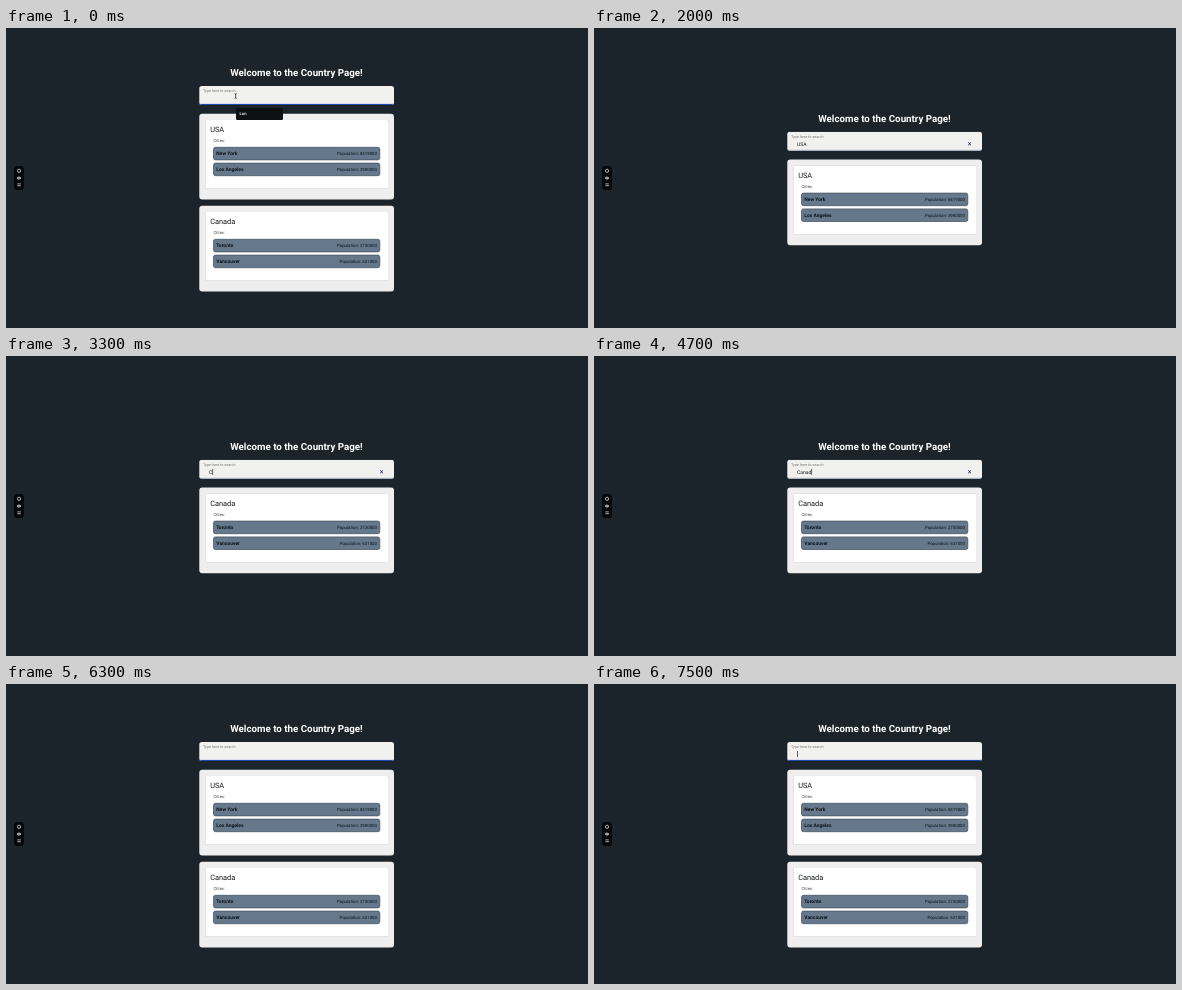
An HTML page that plays this animation: 582x300 px, repeating every 8 s.

```html
<!DOCTYPE html>
<html lang="en">
<head>
<meta charset="utf-8">
<title>Country page</title>
<style>
  html, body { margin: 0; width: 100%; height: 100%; overflow: hidden; background: #1b242b; }
  svg { display: block; width: 582px; height: 300px; }
  text { font-family: Roboto, sans-serif; text-rendering: geometricPrecision; fill: #15191d; }
  .heading { font-size: 9.75px; font-weight: 700; fill: #fff; text-anchor: middle; }
  .label { font-size: 3.75px; fill: #777; }
  .query { font-size: 5px; }
  .country { font-size: 7.4px; }
  .cities { font-size: 4.2px; fill: #444; }
  .city { font-size: 4.95px; font-weight: 700; fill: #0c1218; }
  .population { font-size: 4.35px; fill: #0c1218; text-anchor: end; }
  .row { fill: #66798c; stroke: #3d4c5a; stroke-width: .7; }
  .paper { fill: #fff; filter: drop-shadow(0 .6px .5px rgba(0, 0, 0, .3)); }
</style>
</head>
<body>
<svg viewBox="0 0 582 300">
  <defs>
    <clipPath id="field"><rect x="193.3" y="58" width="194.7" height="19" rx="2.5"/></clipPath>
  </defs>
  <rect width="582" height="300" fill="#1b242b"/>

  <g id="toolbar">
    <rect x="8" y="138" width="10" height="24" rx="3.5" fill="#05080a"/>
    <g fill="none" stroke="#d5d9dc" stroke-width=".8">
      <circle cx="13" cy="142.8" r="1.6"/>
      <path d="M11 150.1q2-2.4 4 0q-2 2.4-4 0zM11.4 155.9h3.4M11.4 157.7h3.4"/>
    </g>
    <circle cx="13" cy="150.1" r=".8" fill="#d5d9dc"/>
  </g>

  <g id="page">
    <text class="heading" x="290.5" y="47.8">Welcome to the Country Page!</text>
    <g clip-path="url(#field)">
      <rect x="193" y="58" width="196" height="19" fill="#f1f1f0"/>
      <rect id="underline" x="193" y="75.9" width="196" height="1.1"/>
    </g>
    <text class="label" x="197" y="64">Type here to search</text>
    <text class="query" id="query" x="203" y="71.8"></text>
    <rect id="caret" y="67" width=".7" height="6" fill="#222"/>
    <path id="clear" d="M374.2 68.7l2.7 2.7m0-2.7l-2.7 2.7" stroke="#24356b" stroke-width="1"/>
    <g id="cards"></g>
  </g>

  <g id="hint">
    <rect x="230" y="80" width="47" height="12" rx="1.5" fill="#0c1013"/>
    <text x="233.5" y="87.3" style="font-size:4.2px;font-weight:500;fill:#fff">Lon</text>
    <path d="M228.6 65.6q1 0 1 .7q0-.7 1-.7M229.6 66v4M228.6 70.4q1 0 1-.7q0 .7 1 .7" fill="none" stroke="#222" stroke-width=".7"/>
  </g>
</svg>
<script>
  const LOOP = 8000, BLINK = 500, CARD_STEP = 92, CENTER_SHIFT = 45.8;
  const countries = [
    { name: 'USA', cities: [['New York', 8419000], ['Los Angeles', 3980000]] },
    { name: 'Canada', cities: [['Toronto', 2730000], ['Vancouver', 631000]] }
  ];
  // [time, search text]; an empty text is a click on the clear button
  const edits = [
    [100, 'U'], [300, 'US'], [500, 'USA'], [2100, ''],
    [3300, 'C'], [3500, 'Ca'], [3600, 'Can'], [3800, 'Cana'], [4700, 'Canad'], [4800, 'Canada'], [5600, ''],
    [6500, 'U'], [7200, '']
  ];

  const $ = id => document.getElementById(id);
  const show = (node, on) => node.style.display = on ? '' : 'none';

  const rowMarkup = ([city, population], i) => {
    const y = 119.3 + 15.8 * i;
    return `<rect class="row" x="207.5" y="${y}" width="166.3" height="12.6" rx="2"/>
      <text class="city" x="210.3" y="${y + 8}">${city}</text>
      <text class="population" x="371" y="${y + 7.8}">Population: ${population}</text>`;
  };
  $('cards').innerHTML = countries.map(({ name, cities }) => `<g>
    <rect x="193.3" y="85.8" width="194.7" height="85.6" rx="3" fill="#eee"/>
    <rect class="paper" x="199.5" y="92" width="182.5" height="68.4" rx="1"/>
    <text class="country" x="204.2" y="104.2">${name}</text>
    <text class="cities" x="207.5" y="114">Cities:</text>
    ${cities.map(rowMarkup).join('')}</g>`).join('');
  const cards = [...$('cards').children];

  function draw(t) {
    const done = edits.filter(([time]) => time <= t);
    const text = done.length ? done.at(-1)[1] : '';
    const lastKey = done.filter(edit => edit[1]).at(-1);
    const caretOn = !!lastKey && Math.floor((t - lastKey[0]) / BLINK) % 2 === 0;

    $('query').textContent = text;
    $('caret').setAttribute('x', 203.1 + (text ? $('query').getComputedTextLength() : 0));
    show($('caret'), caretOn);
    show($('clear'), text);
    show($('hint'), t < edits[0][0]);
    $('underline').setAttribute('fill', text ? '#b4bfd2' : '#1c48a8');
    $('page').setAttribute('transform', `translate(0 ${text ? CENTER_SHIFT : 0})`);

    let slot = 0;
    countries.forEach(({ name }, i) => {
      const match = name.startsWith(text);
      show(cards[i], match);
      if (match) cards[i].setAttribute('transform', `translate(0 ${CARD_STEP * slot++})`);
    });
  }

  const start = performance.now();
  function tick() {
    draw((performance.now() - start) % LOOP);
    requestAnimationFrame(tick);
  }
  tick();
</script>
</body>
</html>
```
